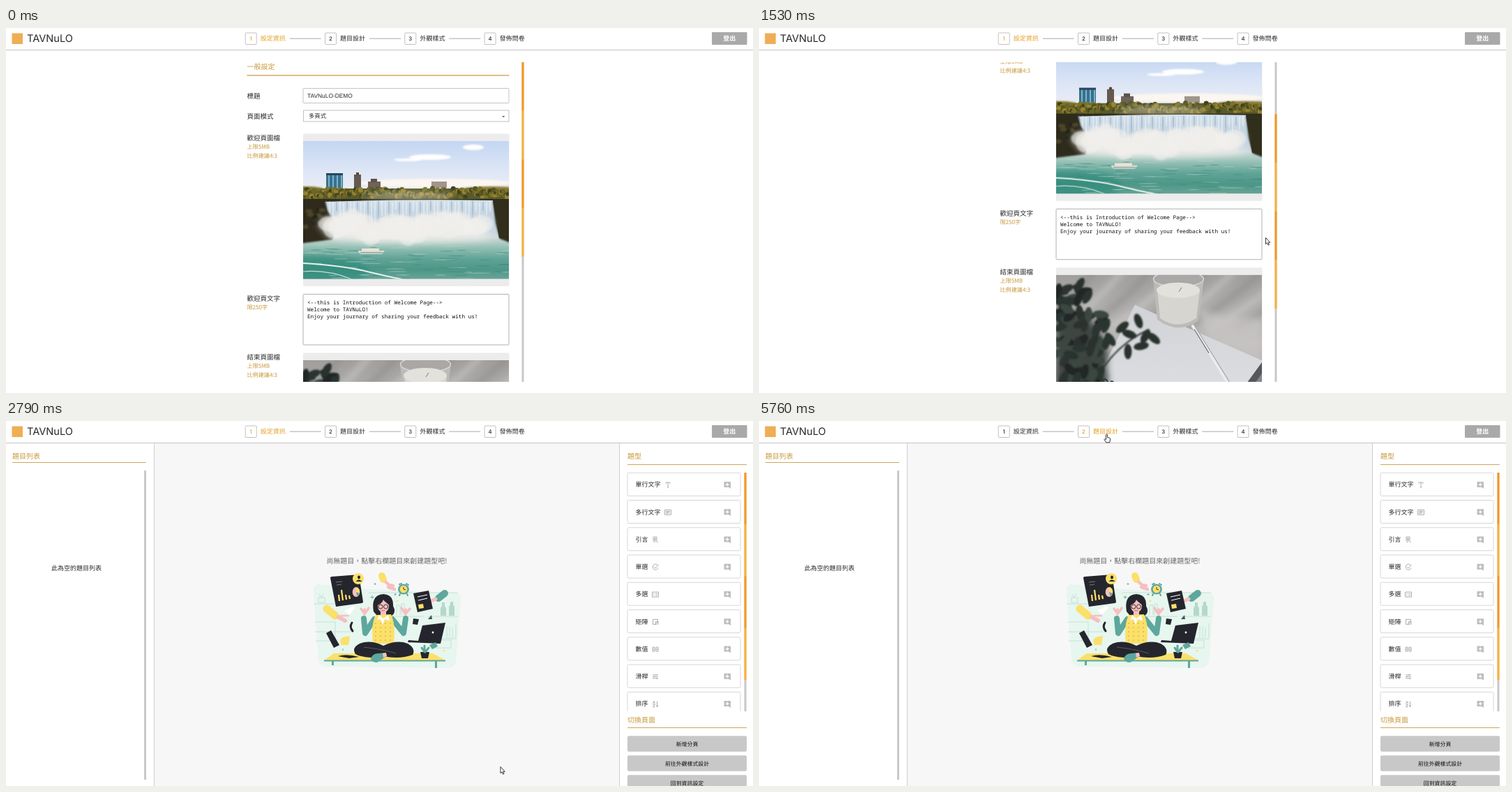
Recreate the animation shown at these times as an HTML page. Size 1071 by 523 pixels, loop 5810 ms.

```html
<!DOCTYPE html>
<html lang="zh-Hant">
<head>
<meta charset="utf-8">
<title>Form builder</title>
<style>
html, body { margin: 0; width: 100%; height: 100%; overflow: hidden; background: #fff; }
svg { display: block; width: 100vw; height: 100vh; }
text { font-family: "Noto Sans CJK TC", "Noto Sans CJK", sans-serif; fill: #2a2a2a; white-space: pre; text-rendering: geometricPrecision; }
.mono { font-family: "Noto Sans Mono", monospace; fill: #111; }
.arial { font-family: "Liberation Sans", Arial, sans-serif; }
.brand, .num { font-family: Inter, sans-serif; }
.gold { fill: #c8983a; }
.bold, .num { font-weight: 500; }
.mid { text-anchor: middle; }
</style>
</head>
<body>
<svg id="stage" viewBox="0 0 1071 523"></svg>
<script>
const LOOP = 5810, BRAND = 'TAVNuLO';
const stage = document.getElementById('stage');

const rect = (x, y, w, h, fill, extra = '') =>
  `<rect x="${x}" y="${y}" width="${w}" height="${h}" fill="${fill}" ${extra}/>`;
const frame = (x, y, w, h, stroke = '#bbb', r = 1) =>
  rect(x, y, w, h, '#fff', `stroke="${stroke}" rx="${r}"`);
const path = (d, fill, extra = '') => `<path d="${d}" fill="${fill}" ${extra}/>`;
const line = (d, stroke, width = 1, extra = '') =>
  path(d, 'none', `stroke="${stroke}" stroke-width="${width}" ${extra}`);
const oval = (x, y, rx, ry, fill, extra = '') =>
  `<ellipse cx="${x}" cy="${y}" rx="${rx}" ry="${ry}" fill="${fill}" ${extra}/>`;
// y is the vertical middle of the line of text
const text = (x, y, size, str, cls = '', extra = '') =>
  `<text x="${x}" y="${y + size * .37}" font-size="${size}" class="${cls}" ${extra}>${str}</text>`;
const repeat = (n, fn) => Array.from({ length: n }, (_, i) => fn(i)).join('');
const random = n => { const v = Math.sin(n * 127.1 + 11.7) * 43758.5453; return v - Math.floor(v); };
const gradient = (id, ...colors) => `<linearGradient id="${id}" x2="0" y2="1">${colors.map((c, i) =>
  `<stop offset="${i / (colors.length - 1)}" stop-color="${c}"/>`).join('')}</linearGradient>`;
const clip = (id, x, y, w, h) => `<clipPath id="${id}">${rect(x, y, w, h, '#000')}</clipPath>`;
const button = (x, y, w, label) =>
  rect(x, y, w, 22.5, '#c8c8c8', 'rx="2"') + text(x + w / 2, y + 11.4, 7.9, label, 'mid bold', 'style="fill:#111"');
const thumb = (x, y, h) => repeat(4, i => rect(x, y + i * h / 4, 3, h / 4, i % 2 ? '#fbb03b' : '#f7981d'));
const blurred = (content, filter = 'blur') => `<g filter="url(#${filter})">${content}</g>`;

const defs = `<defs>
  ${gradient('sky', '#c3d6f2', '#dfe7f6', '#f3f1f0')}
  ${gradient('falls', '#d3e0ea', '#b9cddd', '#d6dee2')}
  ${gradient('river', '#c9d8d3', '#8fbdb2', '#5fa396', '#4c9688', '#6aa698')}
  ${gradient('cloth', '#a19f9d', '#bdbbb9', '#8b8a89')}
  ${gradient('paper', '#d2d3d7', '#dfe0e4')}
  ${clip('photo', 0, 0, 295, 197.5)}${clip('form', 340, 49, 395, 458)}${clip('cards', 885, 70, 172, 346)}
  <filter id="soft" x="-30%" y="-30%" width="160%" height="160%"><feGaussianBlur stdDeviation="5"/></filter>
  <filter id="blur" x="-20%" y="-20%" width="140%" height="140%"><feGaussianBlur stdDeviation="1.3"/></filter>
</defs>`;

function waterfall() {
  const trees = repeat(170, i => oval(i * 1.75, 68 + random(i) * 13, 3.5, 2 + random(i + 200) * 2.5,
    ['#7d7426', '#565626', '#99822f', '#3f431f', '#6b6628'][i % 5]));
  const clouds = oval(182, 23, 30, 4, '#fff') + oval(150, 27, 20, 2, '#fff') + oval(244, 9, 15, 4, '#fff') + oval(190, 60, 110, 6, '#fbf6f0');
  const mist = repeat(34, i => oval(38 + i * 6.6, 112 + random(i + 40) * 24, 11 + random(i) * 8, 8 + random(i + 9) * 9, '#f1efec', 'opacity=".55"'));
  const ripples = repeat(70, i => oval(random(i) * 295, 147 + random(i + 70) * 50, 5 + random(i + 7) * 12, .7,
    i % 2 ? '#b9d5cb' : '#368577', 'opacity=".45"'));
  return rect(0, 0, 295, 90, 'url(#sky)') + blurred(clouds)
    + rect(33, 46, 24, 22, '#3a6f8e') + rect(33, 46, 24, 3, '#27475c') + repeat(4, i => rect(36 + i * 6, 49, 2, 19, '#79b4cb'))
    + rect(73, 48, 10, 22, '#65594f') + rect(76, 45, 4, 4, '#55483e')
    + rect(93, 58, 18, 11, '#6f625a') + rect(97, 54, 9, 5, '#5e5148') + rect(184, 58, 22, 9, '#a0968f')
    + rect(0, 68, 295, 18, '#5a5a29') + blurred(oval(0, 69, 30, 4, '#7d7426') + oval(270, 70, 45, 5, '#8d7a30')) + trees
    + rect(0, 83, 295, 60, '#2f2d20')
    + path('M30 87Q150 83 272 85L282 145H45Z', 'url(#falls)')
    + repeat(48, i => line(`M${33 + i * 5} ${85 + random(i + 5) * 3}v${10 + random(i) * 32}`, i % 3 ? '#f3f6f8' : '#8ba7bf', 1.6, 'opacity=".6"'))
    + rect(0, 139, 295, 60, 'url(#river)')
    + blurred(oval(20, 186, 75, 22, '#2f8a7b', 'opacity=".7"'), 'soft') + ripples
    + blurred(path('M-5 84H31L35 100 46 118 42 141 -5 147Z', '#2d2a1c') + path('M272 86H300V147L282 140 276 118Z', '#332d1f')
      + repeat(14, i => oval(random(i) * 34, 92 + random(i + 30) * 46, 5, 3, i % 2 ? '#4d4529' : '#1f2016')))
    + blurred(oval(150, 78, 65, 5, '#f4f0e6', 'opacity=".5"') + oval(155, 137, 118, 8, '#e4e7e4') + mist, 'soft')
    + blurred(mist)
    + line('M0 175Q55 178 92 187T148 199', '#e8f0ec', 2.2) + line('M0 187Q35 184 70 198', '#c9dfd8', 1.2)
    + path('M78 157H117L113 162H82Z', '#d9ddd5') + rect(84, 154, 25, 3.5, '#e9e5d6') + line('M82 160H114', '#718781');
}

function desk() {
  const leaf = (x, y, turn, color) =>
    oval(0, 0, 11, 5.5, color, `transform="translate(${x} ${y}) rotate(${turn})"`);
  const leaves = repeat(90, i => {
    const y = 8 + random(i) * 190, reach = 25 + 55 * Math.sin(Math.PI * Math.min(1, y / 215));
    return leaf(random(i + 300) * reach, y, random(i + 600) * 180, ['#2b3530', '#202825', '#3a4641', '#2a322f'][i % 4]);
  });
  const twig = [[105, 85], [118, 66], [128, 88], [122, 102], [140, 91], [103, 110], [95, 75]]
    .map(([x, y], i) => leaf(x, y, i * 50 + 20, '#2a332f')).join('');
  const folds = repeat(9, i => line(`M${i * 36 - 30} 75Q${i * 38 + 15} 45 ${i * 40 + 55} -5`, i % 2 ? '#d9d7d5' : '#858381', 8, 'opacity=".5"'));
  return rect(0, 0, 295, 198, 'url(#cloth)')
    + blurred(folds + path('M205 50Q250 65 295 62V130L215 90Z', '#c9c7c5', 'opacity=".7"'), 'soft')
    + blurred(path('M113 48L300 130V199H190L58 153Z', '#77777a'))
    + path('M113 43L296 123V199H200L58 150Z', 'url(#paper)')
    + path('M296 124L258 176 268 199H296Z', '#56575b') + path('M296 140L264 184 271 199H296Z', '#858588')
    + path('M139 5L145 64Q174 86 204 66L212 5Z', '#bdbbb8') + path('M145 22L149 62Q174 80 201 62L206 22Z', '#d6d5d0')
    + oval(175.5, 6, 36, 11, '#aaa8a6', 'stroke="#d9d8d6" stroke-width="1.5"') + oval(175, 22, 31, 11, '#e2e1dc')
    + line('M176 24L180 18', '#777', 1)
    + line('M197 74L259 174', '#a5a6aa', 5) + line('M195 72L255 169', '#ececee', 4) + line('M198 78L219 112', '#6f7074', 1.4)
    + blurred(path('M50 150L200 191V199H50Z', '#77787a'))
    + repeat(13, i => oval(72 + i * 10, 158 + i * 2.9, 4, 9, 'none', `stroke="#2f3133" stroke-width="1.7" transform="rotate(-18 ${72 + i * 10} ${158 + i * 2.9})"`))
    + blurred(path('M0 55Q25 45 48 65 80 95 72 130 82 165 58 199H0Z', '#2b332f', 'opacity=".85"'), 'soft')
    + blurred(leaves + twig + line('M40 190Q65 110 133 78', '#29342d', 2));
}

const photo = (y, draw) => rect(426, y, 295.5, 218.5, '#ececec', 'rx="1.5"')
  + `<g transform="translate(426 ${y + 10.5})" clip-path="url(#photo)">${draw()}</g>`;
const label = (y, title, ...notes) => text(345.5, y, 9.5, title)
  + notes.map((note, i) => text(345.5, y + 13 + i * 12.5, 8.1, note, 'gold bold')).join('');
const area = (y, ...lines) => frame(426, y, 295, 72.5, '#b0b0b0')
  + lines.map((s, i) => text(432, y + 11.5 + i * 10.1, 7.7, s, 'mono')).join('');

const formPage = `<g id="formPage">
  <g clip-path="url(#form)"><g id="scroll">
    ${text(345.5, 55.5, 10, '一般設定', 'gold')}${rect(345.5, 67.2, 376, 1.4, '#cfa65a')}
    ${label(97, '標題')}${frame(426, 86.5, 295, 21, '#c4c4c4')}${text(432, 97.2, 8.4, BRAND + '-DEMO', 'arial')}
    ${label(126.5, '頁面模式')}${frame(426.5, 118, 294.5, 16, '#c0c0c0', 0)}${text(434, 126, 8.4, '多頁式')}
    ${path('M711 126h4.4l-2.2 2.2z', '#666')}
    ${label(157.5, '歡迎頁圖檔', '上限5MB', '比例建議4:3')}${photo(151.5, waterfall)}
    ${label(387.5, '歡迎頁文字', '限250字')}
    ${area(381.5, '&lt;--this is Introduction of Welcome Page--&gt;', `Welcome to ${BRAND}!`, 'Enjoy your journary of sharing your feedback with us!')}
    ${label(471.5, '結束頁圖檔', '上限5MB', '比例建議4:3')}${photo(465.5, desk)}
    ${label(701.5, '結束頁文字', '限250字')}
    ${area(695.5, '&lt;--also has one for End Page--&gt;', 'Thank you for answering this form!')}
    ${button(548, 779.5, 84, '回到管理頁面')}${button(637.5, 779.5, 84, '前往題目設計')}
  </g></g>
  ${rect(739.5, 49, 3, 458, '#c8c8c8')}<g id="thumb">${thumb(739.5, 49, 278.5)}</g>
</g>`;

function illustration() {
  const dark = '#25262d', teal = '#5ea79c', yellow = '#fbe06a', pink = '#f6bfc0', mint = '#c4e2d6';
  const limb = (d, color, w) => line(d, color, w, 'stroke-linecap="round" stroke-linejoin="round"');
  return path('M447 234L520 241 645 246Q652 246 652 256L645 345Q643 354 630 354L460 352Q449 352 448 341L441 246Q440 235 447 234Z', '#e7f6ef')
    + line('M441 262H500M443 288H472V315H444M443 302H495M520 246H648M552 280H600M590 262V246M605 280H648M612 312H645V290M632 294V311M636 294V311M640 296V311M614 314H638V325H612Z', mint)
    + rect(448, 253, 9, 7, 'none', `stroke="${mint}"`) + line('M452 253l-3-5m3 5 3-6', mint)
    + path('M623 279V268l2-3v-5h4v5l2 3v11zM635 279V266l2-3v-4h4v4l2 3v13z', '#b5d8ca')
    + line('M560 278V264h5v14M567 278V262h4v16', mint)
    // table
    + path('M470 333H612L630 343H456Z', yellow) + rect(456, 342.5, 174, 2, teal)
    + rect(467, 344, 3, 6, teal) + rect(615, 344, 3, 10, teal)
    // tablet with charts
    + path('M465 225Q465 223 467 223L506 220 512 259Q512 261 510 261L473 266Z', dark)
    + line('M473 231l9-1M474 235l7-1', '#777', 1.2)
    + line('M478 258l-1-9M483 257l-2-15M488 256l-1-7M493 255l-1-5', yellow, 2.2)
    + oval(502, 245, 5.3, 7, pink) + path('M502 245V238Q508 240 507 247Z', yellow) + path('M502 245l5 2-3 5z', teal)
    + oval(505, 226, 8, 8, yellow) + oval(506, 224, 2, 2.4, dark) + path('M501.5 230q4-5 9 0z', dark)
    // helping hands
    + limb('M460 269L472 279', yellow, 11) + limb('M477 281L486 286', pink, 6) + limb('M480 279L491 279', pink, 2.5)
    + path('M485 272L497 265 501 267 492 278Z', '#fff')
    + limb('M539 222L541 227', yellow, 10) + limb('M545 231L550 236M548 238L557 241M549 235L555 236', pink, 4.5)
    + limb('M629 247L620 254', teal, 10) + limb('M616 255L609 258', pink, 5)
    // clock and checklist
    + oval(570, 241, 8, 7.5, teal) + oval(570, 241, 5.3, 5.2, yellow) + line('M570 238v3l3 1', dark, .9)
    + limb('M564 234l3-1M574 233l3 2M565 248l-1 2M575 248l1 2', teal, 2)
    + path('M584 247L606 243 612 269 590 274Z', dark) + line('M590 252l14-3M591 257l13-3', '#fff', 1) + path('M591 263l7-1 1 6-7 1z', yellow)
    // phones, cup, laptop, plant
    + limb('M496 289Q492 295 497 301', dark, 3) + path('M459 304L466 300 478 321 470 325Z', dark)
    + path('M482 310L493 308 491 321 480 321Z', yellow) + line('M482 312q-4 2-1 6', yellow, 1.5)
    + path('M597 293L630 289 623 319 576 317 577 314 591 315Z', dark) + oval(612, 303, 1.4, 1.4, '#fff')
    + path('M584 283l8 1-2 8-7-1z', dark) + path('M607 321l9-4 3 6-8 4z', teal) + path('M605 284l5-6 1 6z', '#46545a')
    + path('M594 331H607L605 340H596Z', dark) + limb('M600 331l-4-6M600 330v-8M601 331l5-6', teal, 3)
    // woman
    + path('M527 273Q523 249 541 248 556 249 555 265 560 274 553 279H532Z', dark)
    + rect(537, 269, 8, 12, pink) + oval(541, 265, 8, 9.5, pink) + path('M532 264Q533 252 542 252 551 254 550 264 543 259 541 256 539 262 532 264Z', dark)
    + oval(537, 266, 3, 3, 'none', `stroke="${dark}" stroke-width=".9"`) + oval(544.5, 266, 3, 3, 'none', `stroke="${dark}" stroke-width=".9"`)
    + line('M538 271q3 2 5 0', '#b7575f', .9)
    + limb('M528 284L515 304 513 283M554 284L570 304 573 283', teal, 8)
    + path('M530 278L552 277Q559 292 556 319H526Q523 292 530 278Z', yellow)
    + repeat(20, i => oval(530 + i % 4 * 7, 290 + Math.floor(i / 4) * 6, .8, .8, '#c89842'))
    + path('M535 278l6 5 7-5 2 8-7-2-3 8-3-8-5 1z', '#fff')
    + limb('M514 277V270M514 276L509 269M516 274L520 268M573 277V270M573 276L579 269M571 274L567 268', pink, 3.5)
    + path('M507 319Q522 313 541 322 561 313 576 319 588 326 583 335 564 342 541 337 517 342 501 334 495 325 507 319Z', dark)
    + line('M513 324Q540 327 559 333', '#666970', .8)
    + path('M523 341Q525 333 534 333L544 332 546 337 532 346Q525 346 523 341Z', teal) + path('M540 333l5-1 1 5-5 2z', pink)
    + path('M476 337q12-4 30 1l-14 2z', dark)
    + line('M525 250v5M522.5 252.5h5M558 247v3M556.5 248.5h3M529 232v3M527.5 233.5h3M483 326v3', teal, .9)
    + oval(561, 258, 1.3, 1.3, yellow) + oval(628, 329, 1.3, 1.3, yellow);
}

// icons drawn around 0,0
const box = 'M-4.5 -3.5h9v7h-9z';
const cards = [
  ['單行文字', 'M-3 -2v-1.5h6V-2M0 -3.5v7M-1 3.5h2'],
  ['多行文字', box + 'M-3 -1.5h6M-3 0h6M-3 1.5h4'],
  ['引言', 'M-3 -4h5v5h-5zM-2 -2h3M-2 -.5h3M-3 3h3M1 2l3 2'],
  ['單選', 'M3.5 -2.5A4 4 0 1 0 4 1M-2 -.5l2 2 4.5-5'],
  ['多選', box + 'M-3 -1.2h1.5M0 -1.2h3M-3 1.2h1.5M0 1.2h3'],
  ['矩陣', 'M1 3.5h-4.5v-7h7v4M0 0h4v4M0 0v4M2 0v4'],
  ['數值', 'M-4 -3h3v6h-3zM1 -3h3v6h-3zM-4 0h3M1 0h3'],
  ['滑桿', 'M-4 -2.5h8M-4 0h8M-4 2.5h8M1 -3.5v2M-2 -1v2M2 1.5v2'],
  ['排序', 'M-3.5 0l1.5-4 1.5 4M-3.5 1h3l-3 3h3M2.5 -4v8l-1.5-2M2.5 4l1.5-2']
];
const card = ([name, icon], i) => {
  const y = 74.3 + i * 39.25, mid = y + 16.8;
  return frame(891, y, 162, 33, '#d6d6d6', 1.5) + text(902.5, mid, 9, name)
    + line(icon, '#999', .8, `transform="translate(${913 + name.length * 9} ${mid + .5})"`)
    + path(`M1029.5 ${mid - 4}h9.5v10l-2.5-2h-7z`, '#bdbdbd')
    + line(`M1034.2 ${mid - 2.5}v5M1031.7 ${mid}h5`, '#fff', 1.2);
};

const designPage = `<g id="designPage">
  ${rect(212.5, 32, 667, 491, '#f7f7f7')}${rect(212, 32, 1, 491, '#cfcfcf')}${rect(879, 32, 1, 491, '#cfcfcf')}
  ${text(9, 50.5, 10, '題目列表', 'gold')}${rect(9, 59, 192, 1, '#cfa65a')}
  ${rect(198, 71, 3, 443, '#c8c8c8')}${text(101, 211, 9, '此為空的題目列表', 'mid')}
  ${text(546, 200.5, 10, '尚無題目，點擊右欄題目來創建題型吧!', 'mid', 'style="fill:#666"')}
  ${illustration()}
  ${text(891, 50.5, 10, '題型', 'gold')}${rect(891, 62, 171, 1, '#cfa65a')}
  <g clip-path="url(#cards)">${cards.map(card).join('')}</g>
  ${rect(1058.5, 74, 3, 342, '#c8c8c8')}${thumb(1058.5, 74, 297)}
  ${text(891, 428, 10, '切換頁面', 'gold')}${rect(891, 439, 171, 1, '#cfa65a')}
  ${['新增分頁', '前往外觀樣式設計', '回到資訊設定'].map((s, i) => button(891, 451.3 + i * 28, 171, s)).join('')}
</g>`;

const header = rect(0, 31, 1071, 1, '#c4c4c4') + rect(8.5, 7.5, 15.5, 15.5, '#efae55')
  + text(30, 15, 14.6, BRAND, 'brand')
  + ['設定資訊', '題目設計', '外觀樣式', '發佈問卷'].map((name, i) => {
    const x = 343.2 + i * 114.3;
    return frame(x, 7, 16, 16.5, '#c0c0c0') + `<g class="step">${text(x + 8, 15.3, 7.8, i + 1, 'num mid')}${text(x + 21.6, 15, 9, name, 'bold')}</g>`
      + (i < 3 ? rect(x + 63.5, 14.6, 45, 1, '#aaa') : '');
  }).join('')
  + rect(1012, 6, 50.5, 18, '#a9a9a9', 'rx="1"') + text(1037.3, 15, 9, '登出', 'mid', 'font-weight="700" style="fill:#fff"');

const outline = 'stroke="#222" stroke-width=".9" stroke-linejoin="round"';
const cursors = `<g id="cursor">
  ${path('M0 0V9.2L2.1 7.3 3.6 10.7 5.1 10 3.6 6.8H6.3Z', '#fff', outline)}
  ${path('M-1 .8Q0-.6 1 .8V5L4 5.5Q5.3 5.8 5.2 7.5L4.3 12.3H-.8L-3.5 8Q-3.3 6.3-1 8Z', '#fff', outline)}
  ${line('M-2-4.5H-.5L0-4 .5-4.5H2M0-4V4M-2 4.5H-.5L0 4 .5 4.5H2', '#222', .9)}
</g>`;

stage.innerHTML = defs + formPage + designPage + header + cursors;

const [form, design, scroller, bar, cursor] =
  ['formPage', 'designPage', 'scroll', 'thumb', 'cursor'].map(id => document.getElementById(id));
const steps = document.querySelectorAll('.step');
const [arrow, hand, beam] = cursor.children;

// keys are [time, ...values], joined by straight lines
function at(keys, t) {
  const next = keys.findIndex(k => k[0] > t);
  if (next === 0) return keys[0].slice(1);
  if (next < 0) return keys[keys.length - 1].slice(1);
  const a = keys[next - 1], b = keys[next], p = (t - a[0]) / (b[0] - a[0]);
  return a.slice(1).map((v, i) => v + (b[i + 1] - v) * p);
}

const pointerKeys = [
  [70, 1040, 513], [300, 885, 385], [630, 728.5, 295], [850, 726.5, 300.5], [1840, 726.5, 300.5],
  [1910, 718.8, 323.5], [2040, 718.8, 323.5], [2470, 709, 495.5], [3100, 709, 495.5],
  [3670, 391, 33.5], [3780, 391, 33.5], [3800, 380.5, 22], [4220, 380.5, 22],
  [4640, 515, 105.5], [4770, 515, 105.5], [5140, 498.5, 18.5]
];
const scrollKeys = [[1050, 0], [1170, 18.5], [1280, 18.5], [1300, 32], [1530, 121.8], [1910, 295]];
const firstStepKeys = [[2790, 1], [3090, 0], [4200, 0], [4500, 1], [5400, 1], [5740, 0]];

const tint = amount => `rgb(${[[42, 230], [42, 160], [42, 36]].map(([a, b]) => Math.round(a + (b - a) * amount))})`;
const show = (node, visible) => node.setAttribute('display', visible ? 'inline' : 'none');

function draw(now) {
  const t = now % LOOP;
  const designing = t >= 2700 && t < 4200 || t >= 5400;
  show(form, !designing);
  show(design, designing);

  const [offset] = t < 2700 ? at(scrollKeys, t) : [0];
  scroller.setAttribute('transform', `translate(0 ${-offset})`);
  bar.setAttribute('transform', `translate(0 ${offset * .608})`);

  const [first] = at(firstStepKeys, t);
  [first, 1 - first].forEach((amount, i) => {
    for (const part of steps[i].children) part.style.fill = tint(amount);
  });

  const [x, y] = at(pointerKeys, t);
  const onLink = y < 24 || t >= 1880 && t < 2700;
  const onInput = !designing && t > 4200 && y > 86;
  show(cursor, t >= 70);
  cursor.setAttribute('transform', `translate(${x} ${y})`);
  show(hand, onLink);
  show(beam, onInput);
  show(arrow, !onLink && !onInput);
}

const start = performance.now();
function tick() {
  draw(performance.now() - start);
  requestAnimationFrame(tick);
}
tick();
</script>
</body>
</html>
```
